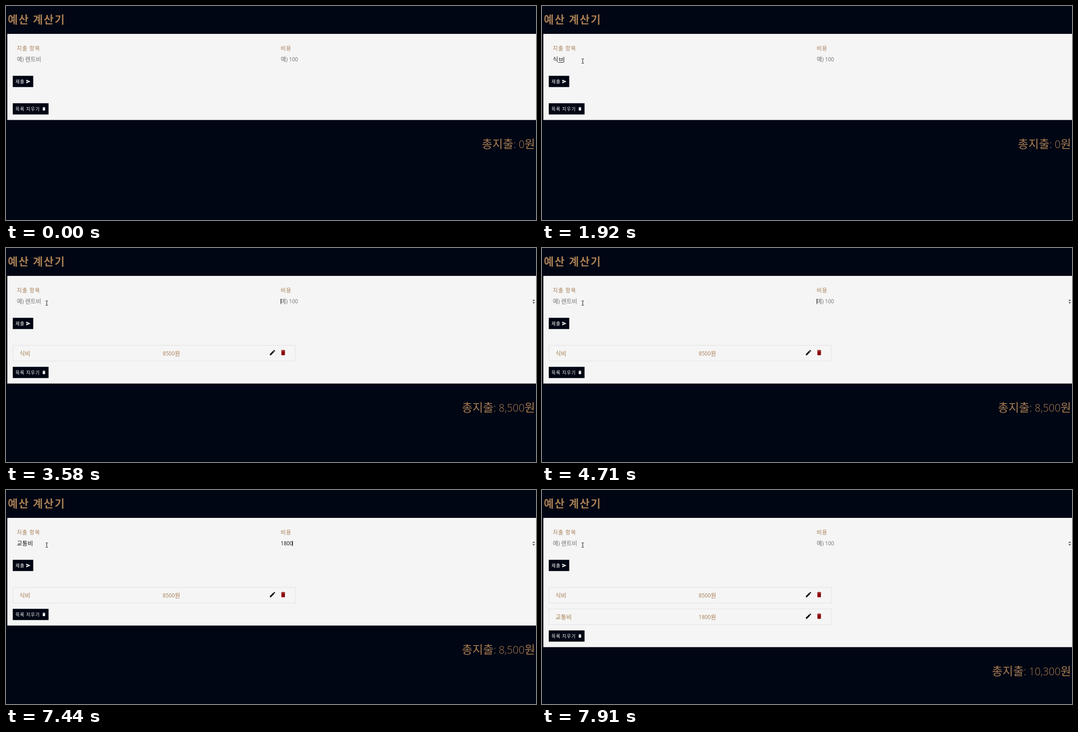
Recreate the animation shown at these times as an HTML page with a canvas. Size 1177x476 px, loop 8 s.

```html
<!DOCTYPE html>
<html lang="ko">
<head>
<meta charset="utf-8">
<title>예산 계산기</title>
<style>
  html, body { margin: 0; width: 100%; height: 100%; overflow: hidden; background: #000613; }
  canvas { display: block; }
</style>
</head>
<body>
<canvas id="stage" width="1177" height="476"></canvas>
<script>
const ctx = document.getElementById('stage').getContext('2d');
const LOOP = 8000, BLINK = 530;
const DARK = '#000613', GOLD = '#a67c52', PANEL = '#f5f5f5', GREY = '#757575', INK = '#151515';
const ITEMS = [['식비', '8500'], ['교통비', '1800']];

const ICONS = {
  send: new Path2D('M2 21L23 12 2 3v7l15 2-15 2z'),
  trash: new Path2D('M6 19c0 1.1.9 2 2 2h8c1.1 0 2-.9 2-2V7H6zM19 4h-3.5l-1-1h-5l-1 1H5v2h14z'),
  pencil: new Path2D('M3 17.25V21h3.75L17.81 9.94l-3.75-3.75zM20.71 7.04c.39-.39.39-1.02 0-1.41l-2.34-2.34c-.39-.39-1.02-.39-1.41 0l-1.83 1.83 3.75 3.75z')
};

// Each step changes part of the form; `composing` is the syllable still being assembled.
const STEPS = [
  [0, { name: '', composing: '', cost: '', focus: '', items: 0, caret: true }],
  [790, { focus: 'name' }],
  [1520, { composing: 'ㅅ' }],
  [1590, { composing: '시' }],
  [1720, { composing: '식' }],
  [1920, { name: '식', composing: 'ㅂ' }],
  [1990, { composing: '비' }],
  [2120, { name: '식비', composing: '', focus: 'cost' }],
  [2580, { cost: '8' }],
  [2780, { cost: '85' }],
  [2990, { cost: '850' }],
  [3120, { cost: '8500' }],
  [3580, { name: '', cost: '', items: 1 }],
  [3650, {}],
  [5040, { focus: 'name' }],
  [5240, { composing: 'ㄱ' }],
  [5780, { composing: '교' }],
  [5970, { composing: '굩' }],
  [6040, { name: '교', composing: '토' }],
  [6110, { composing: '통' }],
  [6300, { name: '교통', composing: 'ㅂ' }],
  [6440, { composing: '비' }],
  [6710, { name: '교통비', composing: '', focus: 'cost' }],
  [7040, { cost: '1' }],
  [7240, { cost: '18' }],
  [7310, { cost: '180' }],
  [7440, { cost: '1800' }],
  [7710, { name: '', cost: '', items: 2 }],
  [7910, { caret: false }]
];

function stateAt(time) {
  const state = {};
  for (const [start, change] of STEPS) {
    if (start > time) break;
    Object.assign(state, change, { start });
  }
  return state;
}

function rect(x, y, w, h, color) {
  ctx.fillStyle = color;
  ctx.fillRect(x, y, w, h);
}

// Hangul and Latin runs use different faces; returns the x where the text ends.
function text(str, x, y, size, color, { weight = 400, spacing = 0, right = false } = {}) {
  const runs = str.match(/[\x00-\x7f]+|[^\x00-\x7f]+/g) || [];
  const setFont = run => {
    ctx.font = run.charCodeAt(0) < 128
      ? `${weight} ${size * 0.9}px "Open Sans", "Noto Sans", sans-serif`
      : `${weight} ${size}px "Noto Sans CJK KR", "Noto Sans CJK", sans-serif`;
    ctx.letterSpacing = spacing + 'px';
    return ctx.measureText(run).width;
  };
  if (right) x -= runs.reduce((sum, run) => sum + setFont(run), 0);
  ctx.fillStyle = color;
  for (const run of runs) {
    const width = setFont(run);
    ctx.fillText(run, x, y);
    x += width;
  }
  return x;
}

function icon(name, x, y, size, color) {
  ctx.save();
  ctx.translate(x, y);
  ctx.scale(size / 24, size / 24);
  ctx.fillStyle = color;
  ctx.fill(ICONS[name]);
  ctx.restore();
}

function polygon(points, fill, stroke) {
  ctx.beginPath();
  points.forEach(([x, y]) => ctx.lineTo(x, y));
  ctx.closePath();
  ctx.fillStyle = fill;
  ctx.fill();
  if (stroke) {
    ctx.strokeStyle = stroke;
    ctx.lineWidth = 1;
    ctx.stroke();
  }
}

function button(label, y, width, iconName, iconX, iconSize) {
  rect(15, y, width, 25, DARK);
  text(label, 21, y + 17, 10, '#fff', { weight: 500, spacing: 1 });
  icon(iconName, iconX, y + 7.2, iconSize, '#fff');
}

function field(x, value, composing, placeholder, caretOn) {
  let end = x;
  if (value || composing) {
    end = text(value, x, 123, 13, INK);
    if (composing) {
      const from = end;
      end = text(composing, from, 123, 13, INK);
      rect(Math.round(from), 125, Math.round(end - from), 1, INK);
    }
  } else {
    text(placeholder, x, 123, 13, GREY);
  }
  if (caretOn) rect(Math.round(end - 0.3), 113, 1, 12, '#000');
}

function form(state, time) {
  const caretOn = state.caret &&
    (state.composing || (time - state.start) % (2 * BLINK) < BLINK);
  const shift = state.items * 48;

  rect(3, 62, 1174, 191.5 + shift, PANEL);
  text('지출 항목', 24, 98.5, 12, GOLD, { spacing: 1 });
  text('비용', 610, 98.5, 12, GOLD, { spacing: 1 });
  field(24, state.name, state.composing, '예) 렌트비', caretOn && state.focus === 'name');
  field(610, state.cost, '', '예) 100', caretOn && state.focus === 'cost');
  if (state.focus === 'cost') {
    polygon([[1169, 117.5], [1175, 117.5], [1172, 114.2]], '#505050');
    polygon([[1169, 120.5], [1175, 120.5], [1172, 123.8]], '#505050');
  }

  button('제출', 155.3, 45.5, 'send', 44.1, 10.8);
  ITEMS.slice(0, state.items).forEach(([name, cost], i) => {
    const y = 216.5 + i * 48;
    ctx.strokeStyle = '#e1e1e1';
    ctx.lineWidth = 1;
    ctx.strokeRect(15.5, y, 627, 35);
    text(name, 30, y + 22, 13, GOLD);
    text(cost + '원', 348, y + 22, 13, GOLD);
    icon('pencil', 584, y + 8.3, 15.6, '#000');
    icon('trash', 607.7, y + 8.3, 15.6, '#8b0000');
  });
  button('목록 지우기', 216.3 + shift, 79.5, 'trash', 79, 10.4);

  const total = ITEMS.slice(0, state.items).reduce((sum, item) => sum + +item[1], 0);
  text(`총지출: ${total.toLocaleString('en-US')}원`, 1175, 316 + shift, 25.5, GOLD,
    { weight: 300, right: true });
}

function pointer(time) {
  if (time < 70) return;
  const step = Math.min(8, Math.floor((time - 70) / 65));
  const left = (1 - step / 8) ** 2;
  const x = Math.round(90 + 906 * left), y = Math.round(122 + 312 * left);

  if ((time >= 790 && time < 920) || (time >= 5040 && time < 5110)) {
    ctx.beginPath();
    ctx.arc(x + 0.5, y + 0.5, 7.5, 0, 2 * Math.PI);
    ctx.strokeStyle = '#000';
    ctx.lineWidth = 1;
    ctx.stroke();
  }
  if (y < 132) {
    rect(x, y - 4, 1, 9, '#000');
    for (const edge of [y - 5, y + 5]) {
      rect(x - 2, edge, 2, 1, '#000');
      rect(x + 1, edge, 2, 1, '#000');
    }
  } else {
    const shape = [[0, 0], [0, 17], [4, 13], [7, 19], [9, 18], [6.5, 12], [12, 12]];
    polygon(shape.map(([dx, dy]) => [x + dx, y + dy]), '#fff', '#000');
  }
}

function draw(now) {
  const time = now % LOOP;
  rect(0, 0, 1177, 476, DARK);
  text('예산 계산기', 4, 39, 24, GOLD, { weight: 700, spacing: 2 });
  form(stateAt(time), time);
  pointer(time);
}

const began = performance.now();
(function tick() {
  draw(performance.now() - began);
  requestAnimationFrame(tick);
})();
</script>
</body>
</html>
```
